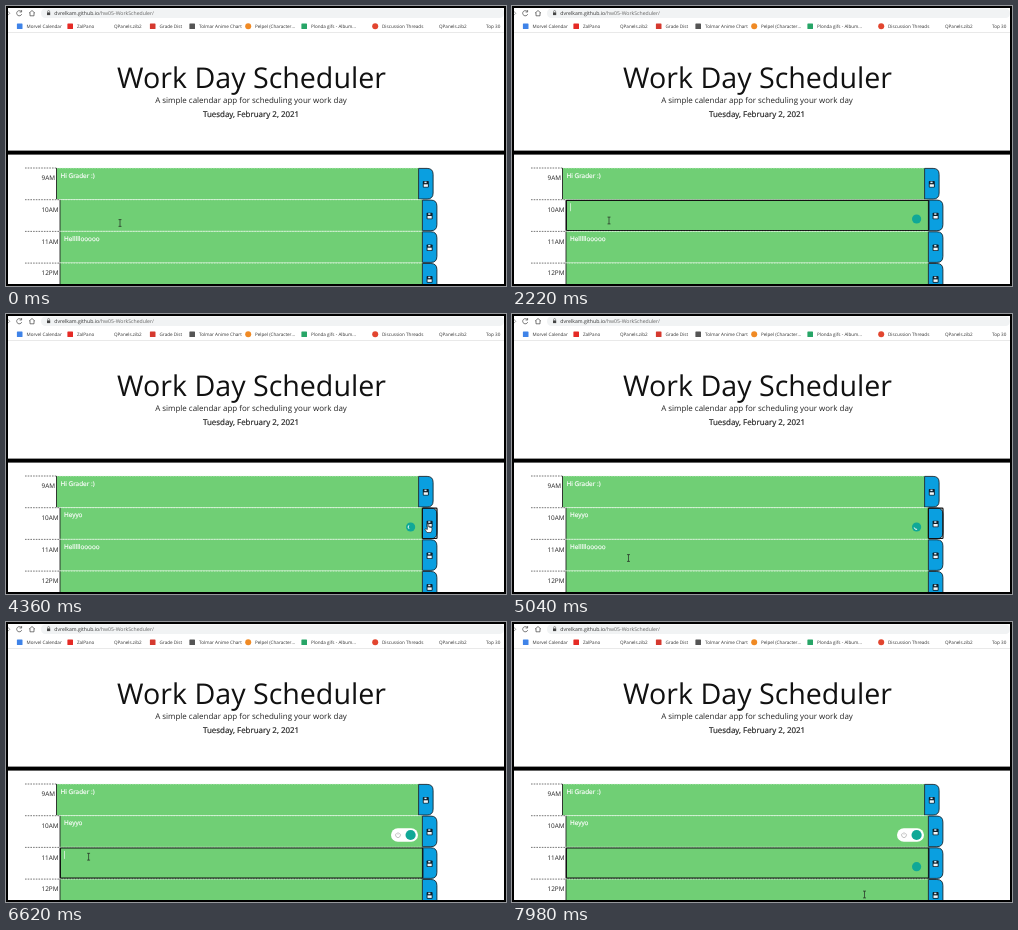
Recreate the animation shown at these times as an HTML page. Size 500 by 280 pixels, loop 8 s.

```html
<!DOCTYPE html>
<html lang="en">
<head>
<meta charset="utf-8">
<title>Work Day Scheduler</title>
<style>
html, body { margin: 0; width: 100%; height: 100%; overflow: hidden; background: #000; }
svg { display: block; width: 100vw; height: 100vh; }
text { font-family: "Open Sans", "Noto Sans", sans-serif; white-space: pre; text-rendering: geometricPrecision; }
</style>
</head>
<body>
<svg id="stage" viewBox="0 0 500 280"></svg>
<script>
const LOOP = 8000;
const GREEN = '#70cf75', BLUE = '#0a9fe0', TEAL = '#10a897';
const stage = document.getElementById('stage');

function add(tag, attrs, parent = stage) {
  const node = document.createElementNS('http://www.w3.org/2000/svg', tag);
  for (const key in attrs) node.setAttribute(key, attrs[key]);
  parent.appendChild(node);
  return node;
}
const rect = (x, y, width, height, fill, more, parent) =>
  add('rect', { x, y, width, height, fill, ...more }, parent);
const circle = (cx, cy, r, fill, parent) => add('circle', { cx, cy, r, fill }, parent);
const path = (d, stroke, width, more, parent) =>
  add('path', { d, stroke, 'stroke-width': width, fill: 'none', ...more }, parent);
function label(str, x, y, size, fill, more, parent) {
  const node = add('text', { x, y, 'font-size': size, fill, ...more }, parent);
  node.textContent = str;
  return node;
}
const heavy = color => ({ stroke: color, 'stroke-width': 0.18 });
const group = parent => add('g', {}, parent);
const show = (node, on) => node.setAttribute('display', on ? 'inline' : 'none');
const place = (node, x, y) => node.setAttribute('transform', `translate(${x} ${y})`);

// Page and browser bar
rect(2, 2, 496, 276, '#fff');
rect(35, 2.5, 463, 9.5, '#f1f3f4', { rx: 4.5 });
path('M1.5 5l2.3 2.3-2.3 2.3', '#777', 0.7);
path('M15.3 5.6A2.6 2.6 0 1 0 15.7 8.2M15.6 4v2h-2', '#444', 0.7);
path('M23 7.2L26 4.5 29 7.2M24 6.6V9.8H28V6.6', '#444', 0.7);
rect(41, 6.4, 3.2, 2.7, '#444');
path('M41.6 6.4V5.5a1 1 0 0 1 2 0V6.4', '#444', 0.5);
const url = label('', 48.3, 9.2, 5.15, '#333');
add('tspan', {}, url).textContent = 'dvrelkam.github.io';
add('tspan', { fill: '#666' }, url).textContent = '/hw05-WorkScheduler/';
path('M2 26.5H498', '#e4e4e4', 0.8);

function bookmark(str, x, color, round) {
  if (color && round) circle(x - 6.8, 20.2, 3, color);
  else if (color) rect(x - 9.6, 17.4, 5.6, 5.6, color, { rx: 0.6 });
  label(str, x, 22, 4.6, '#333');
}
bookmark('Morvel Calendar', 20.5, '#3f83e8');
bookmark('ZalPano', 71, '#e52a25');
bookmark('QPanels.zib2', 108);
bookmark('Grade Dist', 153.5, '#d5392f');
bookmark('Tolmar Anime Chart', 193, '#555');
bookmark('Pelpel (Character...', 249, '#f08a24', true);
bookmark('Plonda gifs - Album...', 305, '#27a567');
bookmark('Discussion Threads', 376, '#e2452f', true);
bookmark('QPanels.zib2', 433);
bookmark('Top 30', 480);

const centered = { 'text-anchor': 'middle' };
label('Work Day Scheduler', 245.5, 82, 28.6, '#111', centered);
label('A simple calendar app for scheduling your work day', 245, 97, 7.96, '#222', centered);
label('Tuesday, February 2, 2021', 245, 111, 7.96, '#222', { ...centered, ...heavy('#222') });
rect(0, 144.6, 500, 4, '#000');

// Schedule rows
function saveIcon(x, y) {
  rect(x - 3, y - 3.2, 6, 6.6, '#10202c', { rx: 0.8 });
  rect(x - 1.4, y - 2.6, 2.2, 1.5, '#d7eefa');
  rect(x - 2.1, y + 0.1, 4.2, 2.5, '#f2f8fb');
}

function makeRow(hour, i) {
  const y = 162 + 31.7 * i, left = i ? 54 : 50.5, right = i ? 416.4 : 412.6;
  path(`M19 ${y}H${left}`, '#555', 0.8, { 'stroke-dasharray': '1.6 1.1' });
  label(hour, left - 1.5, y + 12.2, 6.4, '#222', { 'text-anchor': 'end' });
  rect(left, y, right - left, 31.2, GREEN);
  path(`M${left} ${y}H${right}`, '#e8f7e8', 0.6, { 'stroke-dasharray': '1.6 1.1' });
  path(`M${left} ${y}v31.2`, '#222', 0.9);
  path(`M${right} ${y + 0.4}h8.5q6 0 6 6v18.6q0 6-6 6h-8.5z`, '#182830', 0.9, { fill: BLUE });
  saveIcon(right + 7.2, y + 16.2);
  const row = { x: left + 4, y };
  row.mark = rect(row.x, y + 3.5, 0, 8.5, '#2b70d6');
  row.text = label('', row.x, y + 9.5, 6.4, '#fff', heavy('#fff'));
  row.caret = rect(0, y + 3.5, 0.6, 8, '#fff');
  const focusLine = { stroke: '#111', 'stroke-width': 1.2, rx: 0.8 };
  row.outline = rect(left + 0.4, y + 0.6, right - left, 30.2, 'none', focusLine);
  row.ring = rect(right, y + 0.4, 14.6, 30.4, 'none', focusLine);
  return row;
}
const rows = ['9AM', '10AM', '11AM', '12PM'].map(makeRow);

function setRow(row, str, focused, blinkOn, ring, selected) {
  if (row.text.textContent !== str) row.text.textContent = str;
  const width = str ? row.text.getComputedTextLength() : 0;
  row.mark.setAttribute('width', selected ? width : 0);
  row.caret.setAttribute('x', row.x + width + 0.3);
  show(row.caret, focused && blinkOn && !selected);
  show(row.outline, focused);
  show(row.ring, ring);
}

// Writing helper badges
function makeBadge(y) {
  const g = group();
  const pill = group(g);
  rect(385, y - 6.8, 27, 13.6, '#fff', { rx: 6.8 }, pill);
  path(`M390.6 ${y - 1.8}a2.4 2.4 0 1 0 2.8 0M392 ${y - 2.8}v2.4`, '#999', 0.6, {}, pill);
  const dot = circle(404.6, y, 4.6, TEAL, g);
  const spin = path('M2.4 0A2.4 2.4 0 0 1 0 2.4', '#fff', 0.9, {}, g);
  return { g, pill, dot, spin, y };
}
function setBadge(b, on, loading, open, t) {
  show(b.g, on);
  show(b.pill, open);
  show(b.spin, loading);
  b.dot.setAttribute('r', open ? 5.1 : 4.6);
  b.spin.setAttribute('transform', `translate(404.6 ${b.y}) rotate(${t * 0.45 % 360 - 30})`);
}
const badge10 = makeBadge(213), badge11 = makeBadge(244.7);

// Pointer shapes
const beam = group();
path('M-1.5-3.4H1.5M-1.5 3.4H1.5M0-3.4V3.4', '#1c1c1c', 0.65, {}, beam);
const arrow = group();
path('M0 0V7.2L1.7 5.7 2.9 8.4 4 7.9 2.8 5.3H5z', '#111', 0.6, { fill: '#fff' }, arrow);
const hand = group();
path('M-.6 0q.8-.8 1.4 0V3L4 3.7V6.2L3 8.6H-1L-3 5.2q.4-1 2.4.4z', '#111', 0.6, { fill: '#fff' }, hand);

// Frame around the page
path('M1 1H499V279H1z', '#000', 2);

// time, x, y
const route = [
  [0, 114, 217], [300, 113, 217], [800, 99, 215], [1000, 97, 214.5], [3340, 97, 214.5],
  [3620, 232, 195.5], [4050, 421, 209], [4420, 422, 210], [4960, 118, 243.5],
  [5040, 116.5, 244], [5300, 108, 243], [5800, 83, 236], [6600, 83, 236],
  [7020, 26, 60], [7200, 17, 23], [7280, 17, 23], [7460, 20, 8], [7960, 352.5, 272.5], [LOOP, 352.5, 272.5]
];
function pointerAt(t) {
  let i = 1;
  while (route[i][0] < t) i++;
  const [t0, x0, y0] = route[i - 1], [t1, x1, y1] = route[i];
  const u = (t - t0) / (t1 - t0), k = u * u * (3 - 2 * u);
  return [x0 + (x1 - x0) * k, y0 + (y1 - y0) * k];
}

const keys = [2300, 2440, 2640, 2800, 2960];
const FOCUS = 880, SAVE = 4300, EDIT = 6200, SELECT = 6320, CLEAR = 6480;

function draw(t) {
  const typed = keys.filter(k => t >= k);
  const since10 = t - (typed[typed.length - 1] || FOCUS);
  setRow(rows[0], 'Hi Grader :)');
  setRow(rows[1], 'Heyyo'.slice(0, typed.length), t >= FOCUS && t < SAVE,
    since10 % 1000 < 500, t >= SAVE && t < EDIT);
  setRow(rows[2], t < CLEAR ? 'Helllllooooo' : '', t >= EDIT,
    (t - EDIT) % 1000 < 500, false, t >= SELECT && t < CLEAR);
  setRow(rows[3], '');

  setBadge(badge10, t >= 1100, t >= SAVE && t < 5200, t >= 5400, t);
  setBadge(badge11, t >= 6800, t >= 6800 && t < 7400, false, t);

  const [x, y] = pointerAt(t);
  const visible = t < 2260 || t > 3340;
  const onButton = x > 416 && x < 431 && y > 162;
  const onField = x > 54 && x <= 416 && y > 162;
  show(beam, visible && onField);
  show(hand, visible && onButton);
  show(arrow, visible && !onField && !onButton);
  for (const p of [beam, hand, arrow]) place(p, x, y);
}

const start = performance.now();
function tick() {
  draw((performance.now() - start) % LOOP);
  requestAnimationFrame(tick);
}
tick();
</script>
</body>
</html>
```
